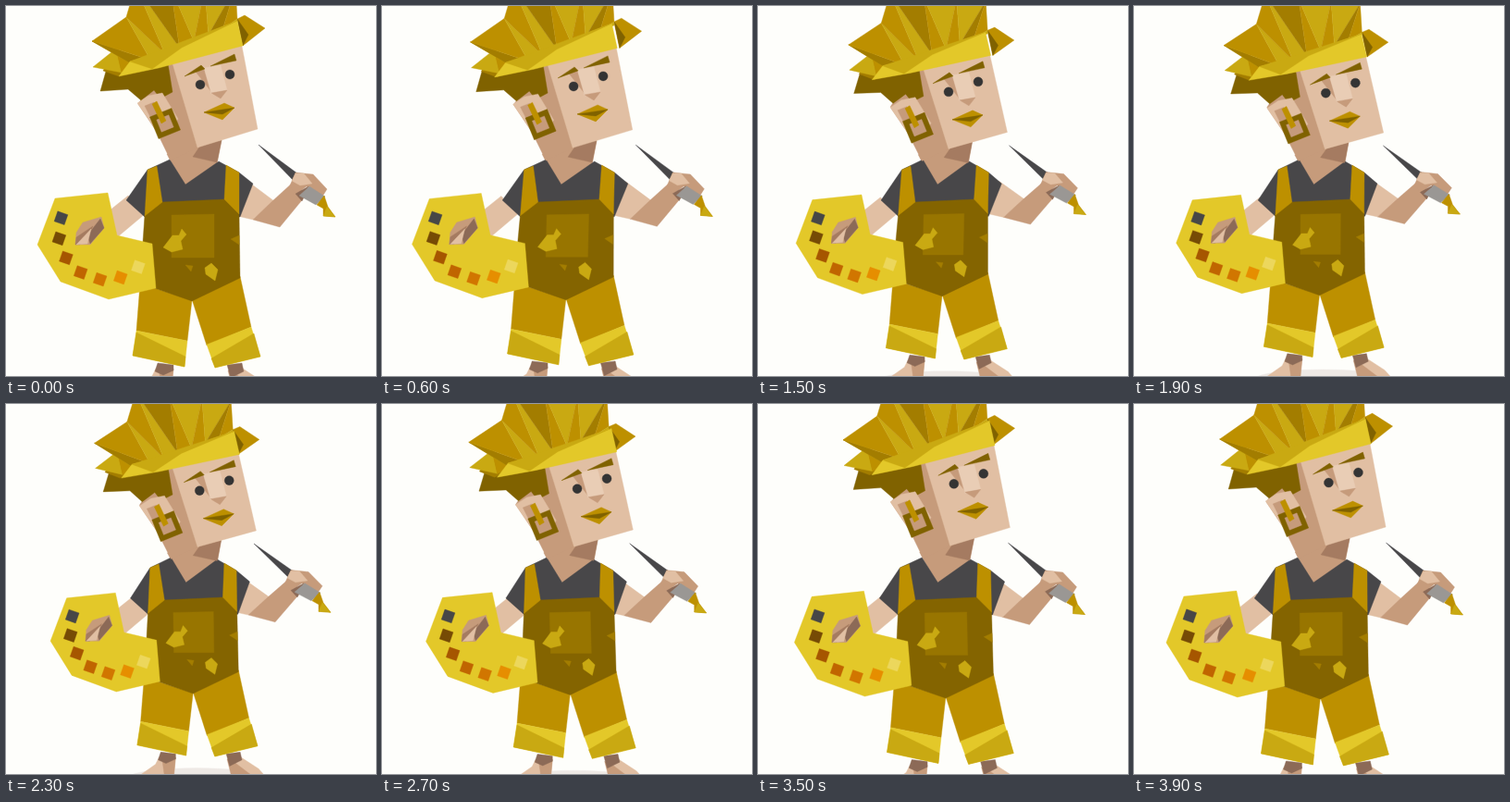
An HTML page that plays this animation: 400 px wide and 400 px high, repeating every 4000 ms.

```html
<!DOCTYPE html>
<html lang="en">
<head>
<meta charset="utf-8">
<title>Painter</title>
<style>
  html, body { margin: 0; width: 100%; height: 100%; overflow: hidden; background: #fefefb; }
  svg { display: block; width: 100vw; height: 100vh; }
</style>
</head>
<body>
<svg id="stage" viewBox="0 0 400 400"></svg>
<script>
const LOOP = 4000, STEP = 100;
const stage = document.getElementById('stage');
const shapes = [];

const C = {
  skin: '#e1bfa3', light: '#e9cdb5', tan: '#c69b7b', dusk: '#a57b61', deep: '#8c6a57',
  shirt: '#484749', bib: '#846400', pocket: '#987500', pants: '#bd9000',
  gold: '#c9a912', sun: '#e3c829', olive: '#806200', bronze: '#a37d00', grey: '#9a9794'
};

const clamp = (v, lo, hi) => Math.min(hi, Math.max(lo, v));
const mix = (p, q, t) => p.map((v, i) => v + (q[i] - v) * t);

// Each part maps a point to [ax, ay, bx]: a follows (1 - cos) / 2, b follows sin.
const body = (x, y) => [(201 - x) * .06, Math.min(0, 215 - y) * .06, -clamp((y - 180) * .03, 0, 2.7)];
const palette = (x, y) => [(190 - x) * .08, (233 - y) * .075, -5];
const brush = (x, y) => [-4, (170 - y) * .05, 2.7];
const face = (x, y) => [-2.2, 9.2, -3];
const ear = (x, y) => [2, 5.5, -1];
const head = (x, y) => {
  const lift = (175 - y) / 100;
  return [(170 - x) * .05 * clamp(lift, 0, 1), lift * x * .036, -1];
};
const hair = (x, y) => {
  const [ax, ay] = head(x, y);
  return [ax, ay, 2.2];
};

function add(part, fill, pts) {
  const list = typeof pts === 'string' ? pts.split(' ').map(p => p.split(',').map(Number)) : pts;
  const el = document.createElementNS('http://www.w3.org/2000/svg', 'polygon');
  el.setAttribute('fill', fill);
  el.setAttribute('stroke', fill);
  el.setAttribute('stroke-width', .4);
  stage.append(el);
  shapes.push({ el, pts: list.map(([x, y]) => [x, y, ...part(x, y)]) });
}

// Regular polygon or ellipse that keeps its shape.
function ring(part, fill, x, y, rx, ry, n, turn = 0) {
  const sway = part(x, y);
  add(() => sway, fill, Array.from({ length: n }, (_, i) => {
    const a = turn + i * 2 * Math.PI / n;
    return [x + rx * Math.cos(a), y + ry * Math.sin(a)];
  }));
}

function drawLegs() {
  ring(body, '#eee9e5', 205, 416, 75, 11, 40);
  add(body, C.skin, '162,392 181,392 179,414 138,414 158,400');
  add(body, C.tan, '166,397 181,392 179,412 168,412');
  add(body, C.deep, '164,386 181,388 181,394 170,399 161,395');
  add(body, C.skin, '241,392 256,392 276,405 284,414 250,414');
  add(body, C.tan, '240,394 250,399 270,414 245,414');
  add(body, C.deep, '239,388 255,386 257,395 243,402');
  add(body, C.pants, '145,300 201,318 196,362 141,351');
  add(body, C.pants, '201,317 253,292 265,347 217,367');
  add(body, C.sun, '141,351 196,362 193,390 137,378');
  add(body, C.gold, '141,353 194,379 193,390 137,378');
  add(body, C.sun, '217,366 265,347 275,379 226,391');
  add(body, C.gold, '226,391 222,381 268,354 275,379');
}

function drawTorso() {
  add(brush, C.skin, '262,190 290,211 267,231 250,227');
  add(brush, C.tan, '267,231 289,210 312,189 324,205 296,239');
  add(palette, C.skin, '132,205 112,221 119,251 150,225');
  add(head, C.tan, '174,160 206,150 233,145 228,171 194,196 178,168');
  add(body, C.shirt, '153,177 177,166 194,193 230,168 252,180 267,192 253,228 150,228 130,210');
  add(head, C.dusk, '202,163 210,151 233,145 228,169');
  add(body, C.bib, '168,212 236,209 252,224 253,294 201,319 152,302 148,255 150,226');
  add(body, C.pants, '153,177 163,173 169,212 150,227');
  add(body, C.pants, '238,172 252,180 252,225 236,209');
  add(body, C.pocket, '179,226 225,225 225,272 179,272');
  add(body, C.gold, '180,248 187,248 190,241 195,247 189,254 191,263 179,266 170,261');
  add(body, C.gold, '215,283 222,278 229,285 226,297 216,290');
  add(body, C.bronze, '194,280 202,281 200,287');
  add(body, C.bronze, '243,252 252,248 252,258');
}

function drawPalette() {
  add(palette, C.sun, '53,208 110,202 120,248 158,257 162,305 111,317 59,298 34,258');
  const paints = ['#474747', '#764b05', '#a65600', '#c06500', '#d17600', '#e68e00', '#ecd75c'];
  paints.forEach((fill, i) => {
    const a = (198 - 25.2 * i) * Math.PI / 180;
    ring(palette, fill, 108 + 51 * Math.cos(a), 245 + 51 * Math.sin(a), 8.2, 8.2, 4, 1.12);
  });
  add(palette, C.tan, '75,258 76,245 83,234 103,228 106,240 91,258');
  add(palette, C.deep, '102,230 106,240 91,257 88,248');
  add(palette, C.dusk, '76,250 94,238 88,250 80,258 75,258');
  add(palette, C.skin, '76,258 92,241 88,257');
}

function drawBrush() {
  add(brush, C.shirt, '273,150 315,181 310,188');
  add(brush, C.tan, '313,180 332,182 347,198 342,206 325,195 313,204 307,194');
  add(brush, C.skin, '313,181 322,181 331,192 318,194 309,189');
  add(brush, C.deep, '313,203 327,195 320,211');
  add(brush, C.grey, '328,195 345,206 335,215 317,205');
  add(brush, C.pants, '344,205 348,217 356,228 343,227 343,219 336,215');
  add(brush, C.gold, '347,217 356,228 343,227');
}

function drawFace() {
  add(head, C.tan, '150,95 160,70 183,60 208,153 178,167 163,136 143,106');
  add(head, C.skin, '180,62 254,38 272,133 207,153');
  add(head, C.olive, '102,92 109,67 122,74 175,62 180,93 167,100 160,91 146,102 132,90');
  add(ear, C.skin, '142,105 154,97 169,94 186,122 176,138 162,134');
  add(ear, C.tan, '150,108 160,104 167,121 160,128');
  ring(ear, C.olive, 172, 127, 18, 18, 4, .4);
  ring(ear, C.tan, 172, 127, 10, 10, 4, .4);
  add(ear, C.pants, '158,106 163,103 173,124 168,127');

  add(face, C.tan, '205,71 214,67 223,94');
  add(face, C.light, '214,67 232,64 239,91 222,95');
  add(face, C.tan, '222,94 239,91 232,100');
  add(face, C.olive, '193,76 211,64 215,68');
  add(face, C.olive, '221,65 247,52 249,59');
  ring(face, '#343434', 210, 85, 5, 5, 16);
  ring(face, '#343434', 242, 74, 5, 5, 16);
  add(face, C.pants, '214,115 236,105 247,110 234,123');
  add(face, C.olive, '214,115 247,110 234,117');
}

// Facets fan from the hair tips down to the headband.
function drawHair() {
  const tips = [[94, 66], [119, 46], [93, 38], [130, 12], [140, -22], [178, -20], [215, -20], [248, -20], [250, 14]];
  const left = [125, 72], right = [250, 18];
  const tones = [C.gold, C.pants, C.gold, C.bronze, C.pants];
  const root = i => mix(left, right, i / (tips.length - 1));
  add(hair, C.pants, '250,14 258,10 280,24 256,43');
  add(hair, C.olive, '250,14 262,31 256,43');
  add(hair, C.bronze, '105,70 119,46 150,62 122,76');
  for (let i = 0; i < tips.length - 1; i++) {
    add(hair, tones[2 * i % 5], [tips[i], tips[i + 1], root(i)]);
    add(hair, tones[(2 * i + 1) % 5], [tips[i + 1], root(i), root(i + 1)]);
  }
  add(head, C.sun, '122,76 134,60 160,53 250,16 256,43 165,67');
  add(head, C.gold, '134,60 250,16 190,45 158,68');
}

function draw(ms) {
  const a = 2 * Math.PI * (Math.floor(ms / STEP) * STEP % LOOP) / LOOP;
  const c = (1 - Math.cos(a)) / 2, s = Math.sin(a);
  for (const { el, pts } of shapes) {
    el.setAttribute('points', pts.map(([x, y, ax, ay, bx]) =>
      (x + ax * c + bx * s).toFixed(2) + ',' + (y + ay * c).toFixed(2)).join(' '));
  }
}

drawLegs();
drawTorso();
drawPalette();
drawBrush();
drawFace();
drawHair();

const start = performance.now();
function tick() {
  draw(performance.now() - start);
  requestAnimationFrame(tick);
}
tick();
</script>
</body>
</html>
```
